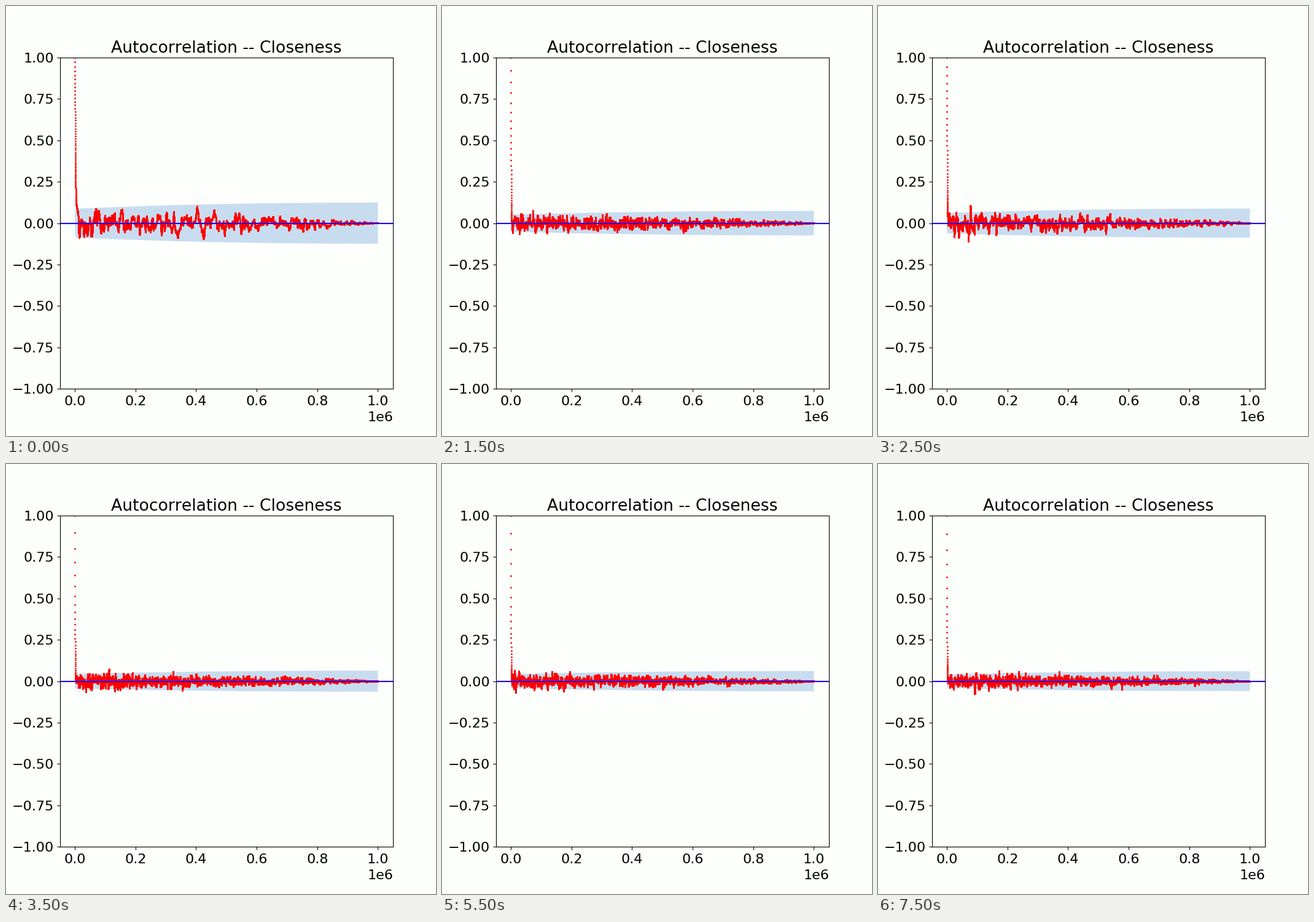
These frames come from a looping animation (700x700 px, 8000 ms). A matplotlib script:

```python
import numpy as np
import matplotlib.pyplot as plt
from matplotlib.animation import FuncAnimation

N, STEP = 20000, 50
LAG = np.arange(N)
PAPER = "#fdfffd"

# Lag-one correlation of each simulated chain, one chain per step.
RHOS = [.973, .947, .936, .926, .969, .947, .918, .90,
        .967, .937, .914, .893, .969, .929, .903, .889]


def base_band(rho):
    """Bartlett 95% half-width once the decay has died out."""
    return 1.035 * 1.96 * np.sqrt((1 + rho**2) / (1 - rho**2) / N)


def smooth_noise(rho, seed):
    """Unit noise with the smoothness of a sampled autocorrelation."""
    white = np.random.default_rng(seed).standard_normal(2 * N)
    omega = np.linspace(0, np.pi, N + 1)
    gain = 1 / np.abs(1 - rho * np.exp(-1j * omega))**2
    noise = np.fft.irfft(np.fft.rfft(white) * gain)[:N]
    return (noise - noise.mean()) / noise.std()


def correlation(rho, seed):
    decay = rho**LAG
    taper = (1 - LAG / N)**.7
    noise = smooth_noise(rho, seed) * base_band(rho) / 1.96 * taper
    return decay + (1 - decay) * noise


def band_outline(rho):
    k = np.r_[1:200, 200:N:100, N - 1]
    growth = 1 + .43 * (1 - (1 - k / N)**2.2)
    half = base_band(rho) * growth * np.sqrt(1 - .9 * rho**(2 * k))
    x = k * STEP
    return np.column_stack([np.r_[x, x[::-1]], np.r_[half, -half[::-1]]])


plt.rcParams.update({"font.family": "DejaVu Sans", "font.size": 16,
                     "text.kerning_factor": 6})
fig, ax = plt.subplots(figsize=(7, 7), dpi=100, facecolor=PAPER)
ax.set_facecolor(PAPER)
ax.set_title("Autocorrelation -- Closeness")
ax.set_xlim(-.05 * N * STEP, 1.05 * N * STEP)
ax.set_ylim(-1, 1)
ax.set_yticks(np.linspace(-1, 1, 9))
ax.tick_params(axis="x", pad=4.3)
ax.xaxis.OFFSETTEXTPAD = 4.5

band, = ax.fill([0, 1, 1], [0, 0, 1], color="#c8dcf0", lw=0, zorder=1)
dots, = ax.plot([], [], "o", color="red", ms=1, zorder=2)
ax.axhline(0, color="#1c00fa", lw=1.5, zorder=2.2)


def update(index):
    rho = RHOS[index]
    dots.set_data(LAG * STEP, correlation(rho, 40 + index))
    band.set_xy(band_outline(rho))
    return dots, band


anim = FuncAnimation(fig, update, frames=len(RHOS), interval=500,
                     repeat=True, repeat_delay=0)
plt.show()
```
